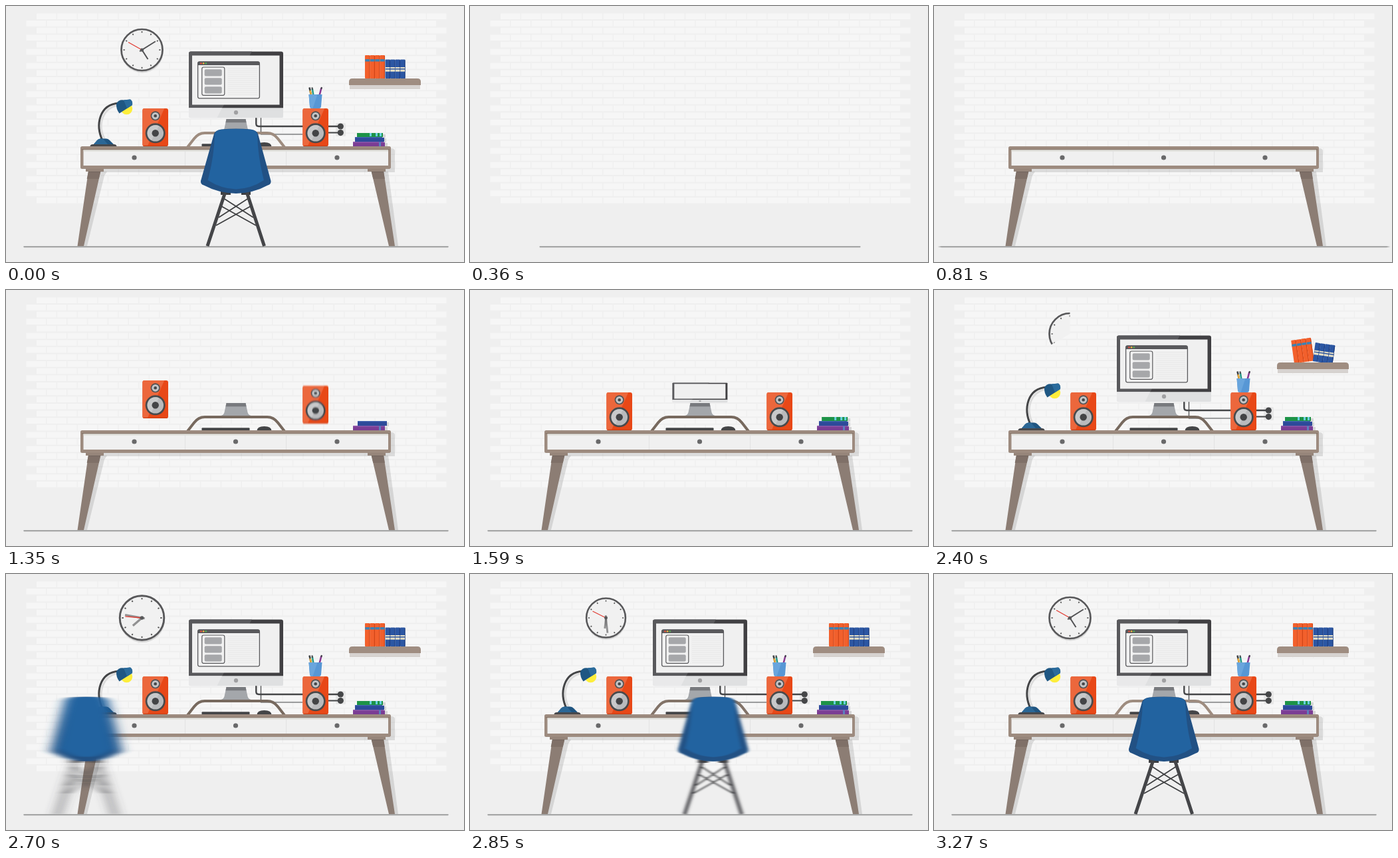
Write an HTML page that moves like this. It is 689 px wide and 385 px high and loops after 4380 ms.

```html
<!DOCTYPE html>
<html lang="en">
<head>
<meta charset="utf-8">
<title>Desk assembly</title>
<style>
  html, body { margin: 0; width: 100%; height: 100%; overflow: hidden; background: #efefef; }
  svg { display: block; width: 100vw; height: 100vh; }
</style>
</head>
<body>
<svg viewBox="0 0 689 385" fill="none">
  <defs>
    <filter id="chairBlur" x="-30%" y="-10%" width="160%" height="120%"><feGaussianBlur stdDeviation="0 0"/></filter>
    <filter id="speakerBlur" x="-10%" y="-30%" width="120%" height="160%"><feGaussianBlur stdDeviation="0 0"/></filter>
    <filter id="handBlur" x="-60%" y="-60%" width="220%" height="220%"><feGaussianBlur stdDeviation="1"/></filter>
    <clipPath id="wipe"><path id="wedge"/></clipPath>
    <clipPath id="case"><rect x="275" y="68.5" width="142" height="99.7" rx="3"/></clipPath>
    <clipPath id="box"><rect x="-19.3" y="-57" width="38.6" height="57" rx="3"/></clipPath>
    <g id="speaker">
      <g clip-path="url(#box)">
        <path fill="#e84817" d="M-20-58h40v58h-40z"/>
        <path fill="#ec673c" d="M-20-58H14L-12 0h-8z"/>
        <path fill="#cf3e12" d="M-20-1.2h40V0h-40z"/>
      </g>
      <circle cy="-45.7" r="7" fill="#515254"/>
      <circle cy="-45.7" r="5.4" fill="#c3c4c6"/>
      <circle cy="-45.7" r="2.3" fill="#454648"/>
      <circle cy="-19.7" r="15" fill="#484a4c"/>
      <circle cy="-19.7" r="12.3" fill="#b9babc"/>
      <path fill="#c8c9ca" d="M5.5-30.7A12.3 12.3 0 0 0-6-9z"/>
      <circle cy="-19.7" r="5.2" fill="#434446"/>
    </g>
  </defs>

  <path id="bricks" fill="#f6f6f6"/>

  <g id="clock">
    <g clip-path="url(#wipe)" id="dial">
      <circle id="clockShadow" cx="205" cy="69" r="31.5" fill="#d7d7d7"/>
      <circle cx="204.5" cy="66" r="31" fill="#f1f1f1" stroke="#58585a" stroke-width="2.7"/>
      <g id="ticks" stroke="#555" stroke-width="1.7"></g>
    </g>
    <g id="hands" stroke="#515153" stroke-width="1.8">
      <path id="hour" stroke-width="2" d="M204.5 66V49.3"/>
      <path id="minute" d="M204.5 70V42"/>
      <path id="second" stroke="#e23b32" stroke-width="1.3" d="M204.5 66V42.5"/>
      <circle cx="204.5" cy="66" r="2.6" fill="#58585a" stroke="none"/>
    </g>
  </g>

  <g id="redBooks"></g>
  <g id="blueBooks"></g>
  <g id="shelf">
    <path fill="#d6d2cf" d="M517 117h106v8H517z"/>
    <path fill="#9f8d81" d="M516 119v-5q0-5 5-5h98q5 0 5 5v5z"/>
  </g>

  <g id="wires" stroke="#454648">
    <rect id="plate" x="496" y="176" width="15" height="20" rx="1.5" fill="#e7e7e7" stroke="none"/>
    <path pathLength="1" stroke-width="2.4" d="M376.3 167v10q0 4 4 4H503"/>
    <path pathLength="1" stroke-width="1.2" d="M383.5 167v26H446"/>
    <path pathLength="1" stroke-width="2.2" d="M466 190.5h37"/>
    <g id="plugs" fill="#454648" stroke="none"><circle cx="503.3" cy="181" r="4.6"/><circle cx="503.3" cy="190.6" r="4.6"/></g>
  </g>

  <g id="stand">
    <path fill="#a4a7ab" d="M331.5 170h29l3 14q1 4 5 5h-45q4-1 5-5z"/>
    <path fill="#787a7e" d="M331.5 170h29l1 5.3h-31z"/>
  </g>

  <g id="monitor">
    <g clip-path="url(#case)">
      <path fill="#414043" d="M275 68h142v86H275z"/>
      <path fill="#59595c" d="M275 68h95l-45 86h-50z"/>
      <path fill="#dfe0e1" d="M275 153.3h142V169H275z"/>
      <path fill="#e9e9ea" d="M275 153.3h50l-8 15.7h-42z"/>
    </g>
    <path fill="#f0f0f0" d="M280 74.5h131.5v74H280z"/>
    <circle cx="346" cy="160.2" r="3.1" fill="#a0a0a2"/>
  </g>

  <g id="win">
    <rect x="288.6" y="84" width="92.8" height="54.8" rx="2.5" fill="#f1f1f1" stroke="#5a5a5d" stroke-width="1.3"/>
    <path fill="#59595c" d="M288.6 89v-3q0-2.4 2.4-2.4h88q2.4 0 2.4 2.4v3z"/>
    <circle cx="293.4" cy="86.2" r="1.3" fill="#e8503c"/>
    <circle cx="297.1" cy="86.2" r="1.3" fill="#f0b43c"/>
    <circle cx="300.8" cy="86.2" r="1.3" fill="#52ae55"/>
    <rect x="294.8" y="92" width="34" height="42.3" rx="2.5" stroke="#5a5a5d" stroke-width="1.2"/>
    <g fill="#a6a7aa">
      <rect x="298.7" y="95.3" width="26" height="10.2" rx="2"/>
      <rect x="298.7" y="108.3" width="26" height="10.2" rx="2"/>
      <rect x="298.7" y="121.3" width="26" height="10.2" rx="2"/>
    </g>
    <path id="textLines" stroke="#e5e5e5" stroke-width=".8"/>
  </g>

  <path id="arch" pathLength="1" stroke-width="4" d="M272.5 213L283 199.500Q289.500 191 299 191H393Q402.500 191 409 199.500L419.500 213"/>
  <g id="keyboard" fill="#444547"><rect x="294.5" y="207.3" width="72" height="5" rx="1"/></g>
  <path id="mouse" fill="#444547" d="M377.500 212q0-7 11-7t11 7z"/>

  <g id="lamp">
    <path id="armShade" pathLength="1" stroke="#dcdcdc" stroke-width="3" d="M150 203C136 180 144 151 174 148"/>
    <path id="arm" pathLength="1" stroke="#434446" stroke-width="3" d="M145.500 203C134 179 140 148 170 146"/>
    <g id="head">
      <circle cx="181.500" cy="154.500" r="8.700" fill="#fdee3c"/>
      <path fill="#1f5783" d="M166 147Q169 140.500 177 141.500L187 140.500Q191 143 190 149L170.500 161.500Q165.500 155 166 147z"/>
      <path fill="#2a6b9c" d="M177 141.500L187 140.500Q191 143 190 149L182 154z"/>
    </g>
    <g id="base">
      <path fill="#1f5581" d="M131 209l6-7q2-2.500 5-2.500h9q3 0 5 2.500l7 7z"/>
      <path fill="#2b6795" d="M131 209l6-7q2-2.500 5-2.500h4l8 9.500z"/>
      <path fill="#47484b" d="M126.500 211.500q0-3.500 4-3.500h32q4 0 4 3.500z"/>
    </g>
  </g>

  <g id="pencils" stroke-width="2.600">
    <path stroke="#3f4245" d="M456.500 122.500l5 23"/>
    <path stroke="#e6a93a" d="M457.500 127l4.500 19"/>
    <path stroke="#2b9c8a" d="M460.800 124.500l3.500 21"/>
    <path stroke="#414447" stroke-width="2" d="M460.400 122.300l.6 3.500"/>
    <path stroke="#8a3a93" d="M474.500 123l-6 23"/>
    <path stroke="#414447" stroke-width="2" d="M475 122l-.8 3"/>
  </g>
  <g id="cup">
    <path fill="#5797d5" d="M455.500 133h20l-1.500 18q-.3 3-3 3h-11q-2.700 0-3-3z"/>
    <path fill="#69a5dd" d="M455.500 133h13l-7 21q-4 .3-4.500-3z"/>
  </g>

  <g id="speakerL"><use href="#speaker"/></g>
  <g id="speakerR"><use href="#speaker"/></g>

  <g id="purple">
    <path fill="#d6d6d6" d="M569 206h5v5h-5z"/>
    <path fill="#7b3d94" d="M522 204.300h48v7h-48z"/><path fill="#9156aa" d="M522 204.300h48v1.500h-48z"/><path fill="#5d7fbe" d="M561 204.300h3v7h-3z"/>
  </g>
  <g id="navy">
    <path fill="#d6d6d6" d="M568 199h4v6h-4z"/>
    <path fill="#2d4a9a" d="M525 197h44v7.300h-44z"/><path fill="#4565b0" d="M525 197h44v1.300h-44z"/>
  </g>
  <g id="green">
    <path fill="#d6d6d6" d="M566 193h5v5h-5z"/>
    <path fill="#1d9347" d="M528 191h39v6h-39z"/><path fill="#68cfe0" d="M547 191h3v5h-3zm9 0h3v5h-3zm6 0h3v5h-3z"/>
  </g>

  <g id="legs">
    <path fill="#000" fill-opacity=".11" d="M130 249h22l-4 6-26 106h-10zM555 249h20l15 112h-10z"/>
    <path fill="#8c7d74" d="M124 248h18.500L117 361h-9.500zM549.500 248H568l17 113h-9z"/>
    <path fill="#7f7068" d="M124 248h18.500l-2.800 12h-18zM549.500 248H568l1.800 12h-17.500z"/>
  </g>
  <g id="desk">
    <path fill="#000" fill-opacity=".11" d="M579 214q6 0 6 4v32H124v-5h455z"/>
    <path fill="#96857a" d="M120 244h27v5h-27zM544 244h27v5h-27z"/>
    <rect x="112" y="211" width="467" height="34" rx="2.500" fill="#9d8b7f"/>
    <path fill="#877669" d="M114 215h463v1.500H114z"/>
    <path fill="#f0f0f0" d="M116.500 216.500h458.500v23.500H116.500z"/>
    <path fill="#dcdcd6" d="M116.500 216.500h458.500v2H116.500z"/>
    <path stroke="#e2e2e2" d="M269.500 218v22M421.500 218v22"/>
    <g fill="#69696a"><circle cx="193" cy="228" r="3.600"/><circle cx="345.500" cy="228" r="3.600"/><circle cx="498" cy="228" r="3.600"/></g>
  </g>
  <path id="floor" fill="#a6a7a7"/>

  <g id="chair"><g id="chairBody">
    <path fill="#3d3e41" d="M323 279h15v5h-15zM354 279h14v5h-14z"/>
    <path stroke="#3f4042" stroke-width="1.800" d="M327 289l45 29M365 289l-45 29M322 300l54 30M370 300l-54 30"/>
    <path stroke="#444548" stroke-width="5" d="M329.500 281L303 361M362.500 281L388.500 361"/>
    <path fill="#225184" d="M312.500 194Q314 186.500 324 185.500Q346 183.500 368 185.500Q378 186.500 379.500 194L398.500 263Q399 268 394 269.500Q372 281.500 346 282Q320 281.500 297.500 269.500Q292.500 268 293 263z"/>
    <path fill="#2263a0" d="M314 193Q315.500 187 324 186Q346 184 368 186Q376.500 187 378 193Q379 228 388 262Q368 275 346 275.500Q324 275 303.500 262Q313 228 314 193z"/>
  </g></g>
</svg>

<script>
const LOOP = 4380, STEP = 30;
const $ = id => document.getElementById(id);
const set = (id, name, value) => $(id).setAttribute(name, value);
const move = (id, x, y, more = '') => set(id, 'transform', `translate(${x} ${y}) ${more}`);
const scale = (id, x, y, sx, sy = sx) => move(id, x, y, `scale(${sx} ${sy}) translate(${-x} ${-y})`);
const fade = (id, v) => set(id, 'opacity', v);

// Smooth monotone curve through pairs of time and value.
function track(t, ...k) {
  const n = k.length / 2, T = i => k[2 * i], V = i => k[2 * i + 1];
  if (t <= T(0)) return V(0);
  if (t >= T(n - 1)) return V(n - 1);
  let i = 0;
  while (t >= T(i + 1)) i++;
  const slope = j => (V(j + 1) - V(j)) / (T(j + 1) - T(j));
  const tangent = j => {
    if (j === 0 || j === n - 1) return 0;
    const a = slope(j - 1), b = slope(j);
    return a * b <= 0 ? 0 : 2 * a * b / (a + b);
  };
  const h = T(i + 1) - T(i), u = (t - T(i)) / h, w = 1 - u;
  return V(i) * (1 + 2 * u) * w * w + V(i + 1) * u * u * (3 - 2 * u)
    + h * u * w * (tangent(i) * w - tangent(i + 1) * u);
}
const ramp = (t, a, b) => track(t, a, 0, b, 1);
const pop = (t, a, b) => track(t, a, 0, a + (b - a) * .6, 1.08, b, 1);

function draw(el, p) {
  el.style.strokeDasharray = p < 1 ? `${p} 2` : 'none';
  el.style.visibility = p > 0 ? 'visible' : 'hidden';
}

function buildWall() {
  let d = '';
  for (let r = 0; r < 27; r++)
    for (let c = 0; c < 20; c++)
      d += `M${(r % 2 ? 30.500 : 46) + c * 30.900} ${11.300 + r * 10.640}h29.600v8.700h-29.600z`;
  set('bricks', 'd', d);
}

function buildBooks(id, x, y, colors, bands, bandColor) {
  const h = 109 - y;
  let s = '';
  for (let i = 0; i < 4; i++) {
    const bx = x + i * 7.500;
    s += `<rect x="${bx}" y="${y}" width="7.500" height="${h}" rx="1" fill="${colors[0]}"/>`
      + `<rect x="${bx + 6.300}" y="${y + 1}" width="1.200" height="${h - 1}" fill="${colors[1]}"/>`;
    for (const [by, bh] of bands)
      s += `<rect x="${bx + .3}" y="${by}" width="6.700" height="${bh}" fill="${bandColor}"/>`;
  }
  $(id).innerHTML = s;
}

function buildDetails() {
  let ticks = '', lines = '';
  for (let i = 0; i < 12; i++)
    ticks += `<path d="M204.500 38v2.200" transform="rotate(${i * 30} 204.500 66)"/>`;
  $('ticks').innerHTML = ticks;
  for (let y = 94; y < 135; y += 3) lines += `M334 ${y}h44`;
  set('textLines', 'd', lines);
}

const chairX = t => track(t, 2550, -440, 2640, -345, 2700, -225, 2760, -100, 2820, -6,
  2850, 20, 2910, 42, 3000, 27, 3120, 5, 3210, .8, 3285, 0);
const speakerY = t => track(t, 0, -18, 90, -10, 120, -1.200, 150, 0);

function wipeClock(t) {
  const a = track(t, 2220, 0, 2400, 120, 2580, 360) * Math.PI / 180;
  const x = 204.500 - 60 * Math.sin(a), y = 66 - 60 * Math.cos(a);
  set('wedge', 'd', a > 6.280 ? 'M120 0h170v140H120z'
    : `M204.500 66V6A60 60 0 ${a > Math.PI ? 1 : 0} 0 ${x} ${y}z`);
  fade('dial', a > 0 ? 1 : 0);
  fade('clockShadow', ramp(t, 2520, 2700));
  scale('clock', 204.500, 66, track(t, 2430, 1, 2640, 1.090, 2730, 1.060, 2850, .95, 3000, 1.020, 3150, 1));
  fade('hands', ramp(t, 2580, 2670));
  const turn = (id, a) => set(id, 'transform', `rotate(${a} 204.500 66)`);
  turn('hour', track(t, 2580, 250, 2850, 186, 3090, 143, 3285, 147.500));
  turn('minute', track(t, 2580, 330, 2850, 174, 3120, 52, 3285, 58));
  turn('second', track(t, 2580, -180, 2760, -52, 2850, -63.500, 3000, -59, 3150, -60.700));
  const blurred = t > 2640 && t < 3000;
  for (const id of ['hour', 'minute']) {
    $(id).style.strokeWidth = blurred ? 3 : '';
    fade(id, blurred ? .6 : 1);
  }
}

function render(t) {
  // floor and desk
  const half = track(t, 60, 0, 450, 300, 540, 319, 690, 345, 810, 340.500, 1050, 323, 1170, 320);
  const l = 346 - half, r = 346 + half, tip = Math.min(half, t > 600 && t < 1110 ? 6 : 1);
  set('floor', 'd', half > 0 ? `M${l} 362L${l + tip} 361H${r - tip}L${r} 362L${r - tip} 363.300H${l + tip}z` : '');
  scale('legs', 346, 361, 1, track(t, 390, 0, 540, .9, 630, 1.030, 720, 1));
  scale('desk', 345.500, 245, track(t, 510, 0, 630, .95, 690, 1.025, 780, 1), track(t, 510, .3, 660, 1));

  // desk items
  draw($('arch'), ramp(t, 900, 1140));
  const tone = ramp(t, 2700, 3120), mix = (a, b) => Math.round(a + (b - a) * tone);
  set('arch', 'stroke', `rgb(${mix(119, 158)},${mix(105, 140)},${mix(94, 127)})`);
  scale('keyboard', 330.500, 211, pop(t, 1080, 1290), 1);
  scale('mouse', 388.500, 212, pop(t, 1140, 1320));
  scale('stand', 346, 189, 1, pop(t, 1110, 1320));
  move('speakerR', 465.700, 211 + speakerY(t - 1260), `scale(${pop(t, 1080, 1230)})`);
  move('speakerL', 224.700, 211 + speakerY(t - 1350), `scale(${pop(t, 1170, 1320)})`);
  const falling = t >= 1290 && t <= 1380;
  if (falling) set('speakerR', 'filter', 'url(#speakerBlur)'); else $('speakerR').removeAttribute('filter');
  document.querySelector('#speakerBlur feGaussianBlur').setAttribute('stdDeviation', '0 1.300');
  [['purple', 1110], ['navy', 1230], ['green', 1440]].forEach(([id, s]) => {
    move(id, track(t, s, 55, s + 90, 14, s + 120, 4, s + 180, 0), 0);
    fade(id, ramp(t, s, s + 90));
  });

  // monitor, cup and lamp
  scale('monitor', 346, 170, track(t, 1560, .5, 1680, 1.050, 1770, 1),
    track(t, 1560, 0, 1620, .7, 1710, 1.100, 1770, .98, 1830, 1));
  move('cup', 0, track(t, 1710, -50, 1800, -5, 1815, 0, 1860, -3, 1950, 0));
  move('pencils', 0, track(t, 1710, -62, 1800, -30, 1860, -16, 1950, 2, 2010, 0));
  fade('cup', ramp(t, 1710, 1770));
  fade('pencils', ramp(t, 1710, 1770));
  move('base', track(t, 1740, -12, 1860, -5.500, 1980, 1, 2040, 0), 0);
  fade('base', ramp(t, 1740, 1800));
  const grow = ramp(t, 1950, 2190);
  draw($('arm'), grow);
  draw($('armShade'), grow);
  scale('head', 169, 148, pop(t, 2130, 2340));

  // screen and cables
  scale('win', 335, 111, pop(t, 2070, 2340));
  document.querySelectorAll('#wires path').forEach((p, i) => draw(p, ramp(t, 1950 + i * 60, 2250 + i * 30)));
  fade('plugs', ramp(t, 2220, 2310));
  fade('plate', ramp(t, 2220, 2310));

  // wall items
  scale('shelf', 570, 114, track(t, 2010, 0, 2160, .9, 2250, 1.070, 2370, 1), 1);
  const lean = track(t, 2220, 14, 2400, 8, 2520, -2, 2610, 0), drop = track(t, 2220, -40, 2340, 0, 2400, 1.500, 2520, 0);
  move('redBooks', lean / 4, drop, `rotate(${-lean} 540 109)`);
  move('blueBooks', -lean / 8, drop + lean / 10, `rotate(${lean} 600 109)`);
  fade('redBooks', ramp(t, 2220, 2310));
  fade('blueBooks', ramp(t, 2220, 2310));
  wipeClock(t);

  // chair
  const blur = Math.abs(chairX(t + 15) - chairX(t - 15)) * .13;
  move('chairBody', chairX(t), 0);
  fade('chair', t < 2580 ? 0 : 1);
  if (blur > .3) set('chairBody', 'filter', 'url(#chairBlur)'); else $('chairBody').removeAttribute('filter');
  document.querySelector('#chairBlur feGaussianBlur').setAttribute('stdDeviation', `${blur} 0`);
}

buildWall();
buildBooks('redBooks', 540, 74, ['#f2602c', '#cf4518'], [[80, 3.500]], '#3b82b4');
buildBooks('blueBooks', 570.500, 80.500, ['#2c57a3', '#1f3f80'], [[92, 2], [95.500, 3.200]], '#e6dfc6');
buildDetails();

const start = performance.now();
function tick() {
  const t = Math.floor(((performance.now() - start) % LOOP) / STEP) * STEP;
  render(t < STEP ? LOOP : t);   // the loop opens on the finished desk
  requestAnimationFrame(tick);
}
tick();
</script>
</body>
</html>
```
